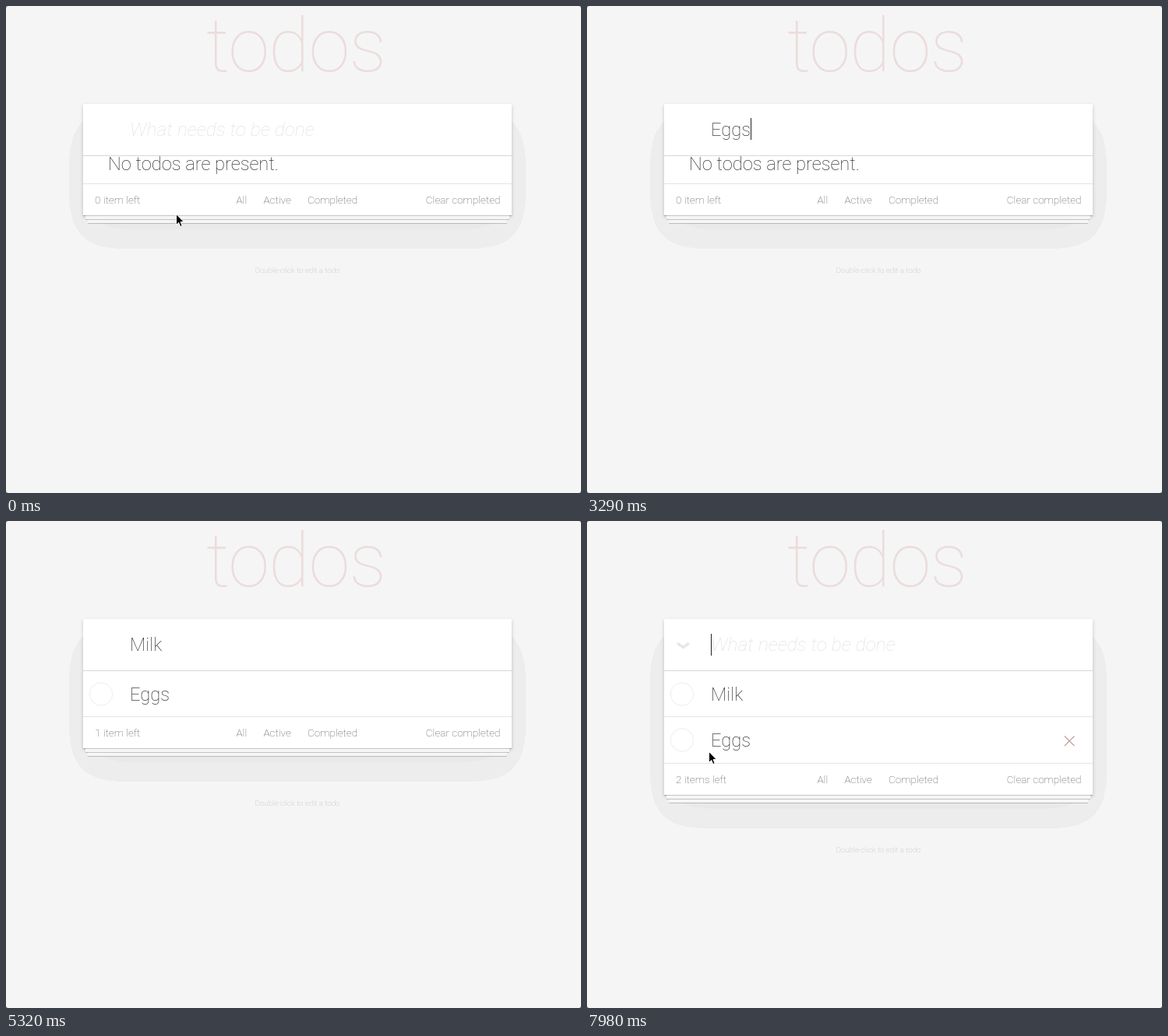
Animation of 738 by 626 pixels, one loop 8000 ms. Source, as an HTML page:

```html
<!DOCTYPE html>
<html lang="en">
<head>
<meta charset="utf-8">
<title>todos</title>
<style>
  html, body { margin: 0; width: 100%; height: 100%; overflow: hidden; background: #555; }
  svg { display: block; font: 200 23.7px Roboto, "Helvetica Neue", sans-serif; fill: #222; }
  .title { font-size: 96px; font-weight: 100; letter-spacing: -1px; fill: #ecdcdc; }
  .placeholder { font-size: 24.6px; font-style: italic; fill: #e0e0e0; }
  .footer { font-size: 13.6px; fill: #505050; }
  .hint { font-size: 9.85px; fill: #b4b4b4; }
  .card { fill: #fff; filter: drop-shadow(0 2px 2px rgba(0, 0, 0, .2)); }
  .sheet { fill: #f6f6f6; filter: drop-shadow(0 1px .5px rgba(0, 0, 0, .2)); }
  .edge { fill: #fff; }
  .line { fill: #e4e4e4; }
  .circle { fill: none; stroke: #ededed; }
  .chevron { fill: none; stroke: #e6e6e6; stroke-width: 3.4; }
  .destroy { fill: none; stroke: #c39a9a; stroke-width: 1.1; }
  .arrow { fill: #000; stroke: #fff; stroke-width: 1; }
  .beam { fill: none; stroke: #444; }
</style>
</head>
<body>
<svg width="738" height="626" viewBox="0 0 738 626">
  <defs>
    <!-- soft shadow reduced to two flat tones -->
    <filter id="bands" filterUnits="userSpaceOnUse" x="0" y="0" width="738" height="626">
      <feGaussianBlur stdDeviation="25"/>
      <feComponentTransfer>
        <feFuncA type="discrete" tableValues="0 0 0 .033 .033 .033 .033 .033 .05 .05 .05 .05 .05"/>
      </feComponentTransfer>
    </filter>
  </defs>
  <rect width="738" height="626" rx="3" fill="#f5f5f5"/>
  <text class="title" x="372" y="84" text-anchor="middle">todos</text>

  <rect id="shade" x="99" y="151" width="550" fill="#000" filter="url(#bands)"/>
  <rect class="card" id="card" x="99" y="126" width="550"/>
  <g id="bottom">
    <rect class="sheet" x="105" y="-20" width="538" height="30"/>
    <rect class="sheet" x="102" y="-20" width="544" height="25"/>
    <rect class="sheet" x="99" y="-20" width="550" height="20"/>
  </g>
  <rect class="edge" id="paper" x="99" y="126" width="550"/>

  <rect x="99" y="191" width="550" height="1" fill="#f6f6f6"/>
  <rect x="99" y="192" width="550" height="1" fill="#dcdcdc"/>
  <path class="chevron" id="chevron" d="M116 157l7.5 5.5 7.5-5.5"/>
  <text class="placeholder" id="placeholder" x="159" y="167">What needs to be done</text>
  <text id="typed" x="159" y="167"></text>
  <rect id="caret" width="1" height="28" fill="#222"/>
  <text id="empty" x="131" y="211">No todos are present.</text>

  <g id="rows"></g>

  <g class="footer" id="footer">
    <rect class="line" x="99" y="-41" width="550" height="1"/>
    <text id="count" x="114" y="-15"></text>
    <text x="295.5" y="-15">All</text>
    <text x="330.5" y="-15">Active</text>
    <text x="387" y="-15">Completed</text>
    <text x="634.5" y="-15" text-anchor="end">Clear completed</text>
    <text class="hint" x="374" y="74" text-anchor="middle">Double-click to edit a todo</text>
  </g>

  <g id="pointer">
    <path class="arrow" id="arrow" d="M.5 .5V14.5L3.7 11.5 5.8 16.6 8.1 15.6 6 10.6H10.2Z"/>
    <path class="beam" id="beam" d="M-2.5 -7.5Q0 -7.5 .5 -6 1 -7.5 3.5 -7.5M.5 -6V6M-2.5 7.5Q0 7.5 .5 6 1 7.5 3.5 7.5"/>
  </g>
</svg>

<script>
const LOOP = 8000, TICK = 70;
const INPUT_BOTTOM = 192, ROW_HEIGHT = 59.5, FOOTER_HEIGHT = 41;

const keys = [
  [2380, 'E'], [2730, 'g'], [2870, 'g'], [3080, 's'], [3500, '\n'],
  [4060, 'M'], [4340, 'i'], [4550, 'l'], [4830, 'k'], [5530, '\n'],
];
const caretToggles = [910, 1400, 1890, 5250, 5880, 6370, 6860, 7350, 7840];
const pointerPath = [
  [0, 218, 267], [280, 214, 174], [490, 214, 174], [560, 214, 166],
  [6790, 214, 166], [7140, 264, 345], [7490, 166, 333], [7770, 166, 333], [7980, 156, 296],
];
const pointerHidden = [2380, 6860];

const el = id => document.getElementById(id);
const show = (node, visible) => node.setAttribute('visibility', visible ? 'visible' : 'hidden');
const moveTo = (node, x, y) => node.setAttribute('transform', `translate(${x} ${y})`);

const rows = [0, 1].map(i => {
  const row = document.createElementNS('http://www.w3.org/2000/svg', 'g');
  row.innerHTML = `
    ${i ? '<rect class="line" x="99" y="0" width="550" height="1"/>' : ''}
    <circle class="circle" cx="122" cy="30.5" r="14.7"/>
    <text x="159" y="39"></text>
    <path class="destroy" d="M613 25.5l12.5 12.5m0-12.5l-12.5 12.5"/>`;
  moveTo(row, 0, Math.floor(INPUT_BOTTOM + i * ROW_HEIGHT));
  el('rows').append(row);
  return { node: row, label: row.querySelector('text'), destroy: row.querySelector('.destroy') };
});

function typedState(t) {
  let text = '';
  const items = [];
  for (const [time, key] of keys) {
    if (time > t) break;
    if (key === '\n') {
      items.unshift(text);
      text = '';
    } else text += key;
  }
  return { text, items };
}

function pointerAt(t) {
  const next = pointerPath.findIndex(p => p[0] > t);
  if (next < 0) return pointerPath.at(-1).slice(1);
  const [t0, x0, y0] = pointerPath[next - 1], [t1, x1, y1] = pointerPath[next];
  const k = (t - t0) / (t1 - t0), ease = k * k * (3 - 2 * k);
  return [Math.round(x0 + (x1 - x0) * ease), Math.round(y0 + (y1 - y0) * ease)];
}

function draw(t) {
  const { text, items } = typedState(t);
  const n = items.length;
  const footerTop = n ? Math.floor(INPUT_BOTTOM + n * ROW_HEIGHT) : 228;
  const bottom = footerTop + FOOTER_HEIGHT;

  for (const id of ['shade', 'card', 'paper']) el(id).setAttribute('height', bottom - 126);
  moveTo(el('bottom'), 0, bottom);
  moveTo(el('footer'), 0, bottom);
  el('count').textContent = `${n} item${n > 1 ? 's' : ''} left`;
  show(el('empty'), !n);
  show(el('chevron'), n > 1);

  el('typed').textContent = text;
  show(el('placeholder'), !text);
  const caret = el('caret');
  caret.setAttribute('x', Math.round(159 + (text ? el('typed').getComputedTextLength() : 0)));
  caret.setAttribute('y', text ? 144 : 145);
  show(caret, caretToggles.filter(time => time <= t).length % 2);

  const [x, y] = pointerAt(t);
  const pointerOn = t < pointerHidden[0] || t >= pointerHidden[1];
  const overInput = y < INPUT_BOTTOM;
  moveTo(el('pointer'), x, y);
  show(el('arrow'), pointerOn && !overInput);
  show(el('beam'), pointerOn && overInput);

  const hovered = y < footerTop ? Math.floor((y - INPUT_BOTTOM) / ROW_HEIGHT) : -1;
  rows.forEach((row, i) => {
    show(row.node, i < n);
    row.label.textContent = items[i] || '';
    show(row.destroy, i < n && pointerOn && i === hovered);
  });
}

const start = performance.now();
function frame() {
  const t = (performance.now() - start) % LOOP;
  draw(Math.floor(t / TICK) * TICK);
  requestAnimationFrame(frame);
}
frame();
</script>
</body>
</html>
```
